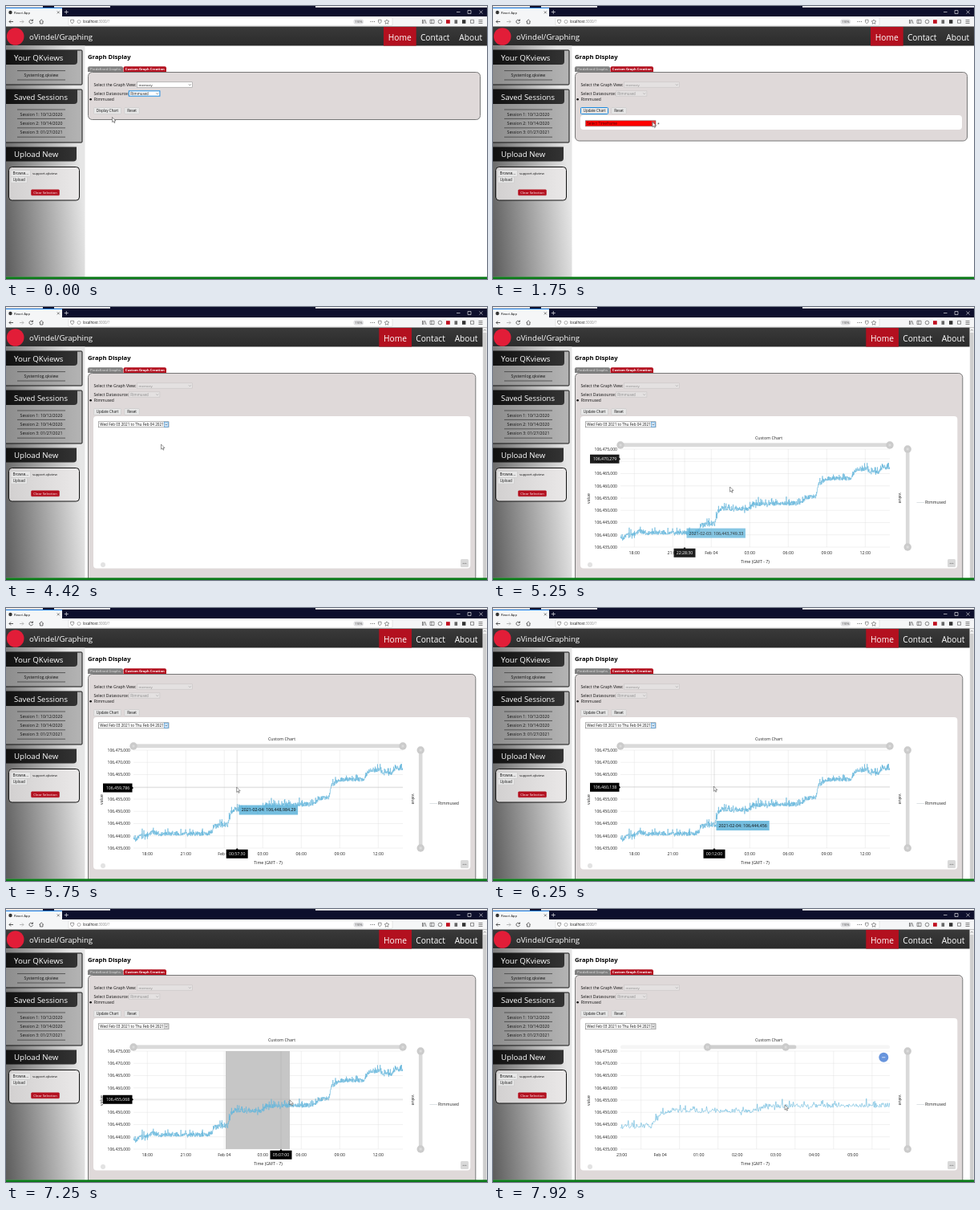
These frames come from a looping animation (600x340 px, 8 s). An HTML page:

```html
<!DOCTYPE html>
<html lang="en">
<head>
<meta charset="utf-8">
<title>Graph Display</title>
<style>
html, body { margin: 0; width: 100%; height: 100%; overflow: hidden; background: #fff; }
svg { display: block; width: 600px; height: 340px; }
text { font-family: "Open Sans", "Noto Sans", sans-serif; white-space: pre; }
</style>
</head>
<body>
<svg id="stage" viewBox="0 0 600 340" xmlns="http://www.w3.org/2000/svg">
  <defs>
    <linearGradient id="side" x1="0" y1="1" x2="1" y2=".75">
      <stop offset="0" stop-color="#5c5c5c"/><stop offset="1" stop-color="#e6e6e6"/>
    </linearGradient>
    <linearGradient id="head" x1="0" y1="0" x2="0" y2="1">
      <stop offset="0" stop-color="#3a3a3a"/><stop offset="1" stop-color="#2b2b2b"/>
    </linearGradient>
    <linearGradient id="card" x1="0" y1="0" x2="1" y2="0">
      <stop offset="0" stop-color="#111"/><stop offset="1" stop-color="#333"/>
    </linearGradient>
    <linearGradient id="box" x1="0" y1="0" x2="1" y2="0">
      <stop offset="0" stop-color="#8c8c8c"/><stop offset="1" stop-color="#b4b4b4"/>
    </linearGradient>
    <linearGradient id="form" x1="0" y1="0" x2="1" y2="0">
      <stop offset="0" stop-color="#d2d0d0"/><stop offset="1" stop-color="#eae8e8"/>
    </linearGradient>
    <clipPath id="plot"><rect x="159" y="177" width="336" height="122"/></clipPath>
  </defs>
</svg>
<script>
const LOOP = 8000, STEP = 1000 / 12;
const RED = '#b3101f', BLUE = '#67b7dc';
const LEFT = 159, RIGHT = 495, TOP = 177, BOTTOM = 299;
const MIDNIGHT = 272.3, HOUR = 16;
const svg = document.getElementById('stage');

// ---------- drawing helpers ----------
function el(parent, name, attrs, content) {
  const node = document.createElementNS('http://www.w3.org/2000/svg', name);
  for (const key in attrs) node.setAttribute(key, attrs[key]);
  if (content !== undefined) node.textContent = content;
  parent.appendChild(node);
  return node;
}
const set = (node, attrs) => { for (const key in attrs) node.setAttribute(key, attrs[key]); };
const show = (node, on) => { node.style.display = on ? '' : 'none'; };
const group = (parent, attrs) => el(parent, 'g', attrs);
const rect = (p, x, y, width, height, fill, more) => el(p, 'rect', { x, y, width, height, fill, ...more });
const circle = (p, cx, cy, r, fill, more) => el(p, 'circle', { cx, cy, r, fill, ...more });
const path = (p, d, stroke, width = 0.7, more) =>
  el(p, 'path', { d, stroke, 'stroke-width': width, fill: 'none', ...more });
const text = (p, x, y, size, str, fill = '#111', more) =>
  el(p, 'text', { x, y, 'font-size': size, fill, ...more }, str);
const mid = { 'text-anchor': 'middle' };
const end = { 'text-anchor': 'end' };

function button(p, x, y, w, h, label, size = 4.4, fill = '#e6e6e6', color = '#111', line = '#c2c2c2') {
  const g = group(p);
  g.box = rect(g, x, y, w, h, fill, { rx: 1, stroke: line, 'stroke-width': 0.5 });
  g.label = text(g, x + w / 2, y + h / 2 + 1.6, size, label, color, mid);
  return g;
}
function select(p, x, y, w, h, label, size) {
  const g = group(p);
  g.box = rect(g, x, y, w, h, '#fff', { stroke: '#999', 'stroke-width': 0.6 });
  g.label = text(g, x + 2, y + h / 2 + 1.6, size, label);
  g.arrow = path(g, `M${x + w - 4.6} ${y + h / 2 - 0.6}l1.4 1.4 1.4-1.4`, '#444', 0.6);
  return g;
}

// ---------- browser frame ----------
function browser() {
  rect(svg, 0, 0, 600, 13, '#0d0f2c');
  for (const [x, w] of [[0, 46], [60, 70], [386, 214]]) rect(svg, x, 0, w, 1.8, '#f4f4f4');
  rect(svg, 0, 2.4, 70, 11, '#f5f6f7');
  rect(svg, 0, 2.2, 70, 0.8, '#0a84ff');
  circle(svg, 5.5, 8, 2.2, '#333');
  text(svg, 10, 9.6, 4.3, 'React App');
  path(svg, 'M63.8 6.4l3 3m0-3l-3 3', '#333', 0.6);
  path(svg, 'M72.8 7.5h5m-2.5-2.5v5M562 7.5h4.5', '#fff', 0.6);
  path(svg, 'M576 5.5h4v4h-4zM590.5 5.5l4 4m0-4l-4 4', '#fff', 0.6);
  rect(svg, 0, 13, 600, 12.5, '#f5f6f7');
  path(svg, 'M9 19.5h-5m2-2l-2 2 2 2', '#333', 0.8);
  path(svg, 'M17 19.5h5m-2-2l2 2-2 2', '#aaa', 0.8);
  path(svg, 'M33 18a2.3 2.3 0 1 0 .5 2M33.5 16.5v2h-2', '#333');
  path(svg, 'M41.5 19.5l2.7-2.6 2.7 2.6M42.5 19v3h3.4v-3', '#333');
  rect(svg, 78, 14.5, 404, 9.8, '#fff', { rx: 1, stroke: '#ccc', 'stroke-width': 0.5 });
  path(svg, 'M80.6 17.2h4v2.4l-2 2.4-2-2.4z', '#555', 0.6);
  circle(svg, 91, 19.5, 2, 'none', { stroke: '#666', 'stroke-width': 0.5 });
  const url = text(svg, 96, 21, 4.4, 'localhost', '#111');
  el(url, 'tspan', { fill: '#888' }, ':3000/?');
  rect(svg, 433.5, 16.3, 12.5, 6.4, '#e2e2e4', { rx: 3 });
  text(svg, 439.8, 20.9, 3.6, '110%', '#333', mid);
  for (const x of [455, 457.3, 459.6]) circle(svg, x, 19.5, 0.6, '#555');
  path(svg, 'M464.5 17.2h3.6v3l-1.8 1.6-1.8-1.6z', '#555', 0.6);
  path(svg, 'M475 16.8l.9 1.9 2 .2-1.5 1.4.4 2-1.8-1-1.8 1 .4-2-1.5-1.4 2-.2z', '#555', 0.6);
  path(svg, 'M519.5 17v5m1.5-5v5m1.5-5l1.6 5', '#444');
  path(svg, 'M529 17.2h5v4.4h-5zM531 17.2v4.4', '#444', 0.6);
  circle(svg, 541.5, 19.5, 2.3, 'none', { stroke: '#444', 'stroke-width': 0.6 });
  rect(svg, 549, 17.2, 4.8, 4.6, '#c00f1f');
  rect(svg, 559.5, 17.3, 3.6, 4.6, '#666');
  rect(svg, 569, 17.2, 4.4, 4.6, '#333');
  path(svg, 'M579.5 17.3h4v4h-4z', '#444', 0.6);
  path(svg, 'M589.5 17.5h5m-5 2h5m-5 2h5', '#333', 0.6);
}

// ---------- page parts that stay ----------
function header() {
  rect(svg, 0, 25.5, 600, 24, 'url(#head)');
  circle(svg, 11.7, 38, 10.8, '#e21d38');
  text(svg, 29, 41.9, 9.7, 'oVindel/Graphing', '#fff');
  const nav = group(svg);
  rect(nav, 471, 26, 40.7, 23.5, RED);
  text(nav, 491.2, 42.6, 10.2, 'Home', '#fff', mid);
  text(nav, 535.2, 42.6, 10.2, 'Contact', '#fff', mid);
  text(nav, 579.7, 42.6, 10.2, 'About', '#fff', mid);
  return nav;
}
function card(y, h, title, size, w = 95) {
  if (h) rect(svg, -3, y, w + 3, h, 'url(#box)', { rx: 1, stroke: '#111', 'stroke-width': 1 });
  path(svg, `M0 ${y}h${w - 6}v14q0 4-4 4H0z`, 'none', 0, { fill: 'url(#card)' });
  text(svg, 10, y + 12.9, size, title, '#fff');
}
function rows(first, list) {
  const line = y => path(svg, `M14 ${y}h60`, '#222', 0.6);
  line(first);
  list.forEach((str, i) => {
    text(svg, 44, first + 7.6 + i * 11.4, 5.2, str, '#111', mid);
    line(first + 11.4 * (i + 1));
  });
}
function sidebar() {
  rect(svg, 0, 49.5, 98.5, 288, 'url(#side)');
  card(55, 43, 'Your QKviews', 9.7);
  rows(80.6, ['Systemlog.qkview']);
  card(104, 66, 'Saved Sessions', 9.5);
  rows(129, ['Session 1: 10/12/2020', 'Session 2: 10/14/2020', 'Session 3: 01/27/2021']);
  card(175.5, 0, 'Upload New', 9.7, 94);
  rect(svg, 3.5, 200.5, 88, 41.5, 'url(#form)', { rx: 4, stroke: '#111', 'stroke-width': 1 });
  button(svg, 6, 204.5, 24.5, 8, 'Browse...', 4.6);
  text(svg, 33, 210.2, 4.3, 'support.qkview');
  button(svg, 6, 212.8, 20.5, 7.4, 'Upload', 4.5);
  button(svg, 31.5, 228.8, 35, 7, 'Clear Selection', 4.3, RED, '#fff', RED);
}

browser();
const nav = header();
sidebar();
const scroll = group(svg);
rect(scroll, 594.5, 25.5, 5.5, 312, '#f0f0f0');
rect(scroll, 595.2, 32, 4.2, 306, '#cdcdcd');
path(scroll, 'M596 29.5l1.3-1.4 1.3 1.4', '#555', 0.6);

text(svg, 102, 65.6, 7.7, 'Graph Display', '#000', { 'font-weight': 700 });
const panel = rect(svg, 102.5, 82.5, 489, 59, '#dfd9d9', { rx: 5, stroke: '#777', 'stroke-width': 1 });
const tab = (x, w, fill) => path(svg, `M${x} 82v-4.7q0-2 2-2h${w - 4}q2 0 2 2v4.7z`, 'none', 0, { fill });
tab(102, 44, '#808080');
text(svg, 124, 80.1, 4.35, 'Predefined Graphs', '#e6e6e6', mid);
tab(146.5, 53.5, RED);
text(svg, 173.3, 80.1, 4.2, 'Custom Graph Creation', '#fff', { ...mid, 'font-weight': 700 });
text(svg, 109.5, 99.8, 5.1, 'Select the Graph View:');
text(svg, 109.5, 110.9, 5.1, 'Select Datasource:');
circle(svg, 105.6, 116.2, 1.3, '#000');
text(svg, 109.8, 118.2, 4.9, 'Rtmmused');
const view = select(svg, 163.5, 94.8, 69, 6.4, 'memory', 4.35);
const source = select(svg, 153.3, 105.8, 38.6, 6.4, 'Rtmmused', 4.4);
const go = button(svg, 109.5, 126.5, 34, 8, 'Display Chart');
button(svg, 147.8, 126.5, 18.5, 8, 'Reset', 4.5);

const white = rect(svg, 109, 136, 476, 18, '#fff', { rx: 4 });
const frame = select(svg, 115.3, 142.8, 87.7, 7, '', 4.65);
const frameBox = rect(frame, 197.6, 143.2, 5, 6.2, '#cfe6fa', { 'stroke-width': 0.6 });
frame.appendChild(frame.arrow);
const star = text(svg, 205, 148.8, 5, '*', '#333');
const menu = group(svg);
rect(menu, 115.3, 150.3, 87.7, 15, '#fff', { stroke: '#888', 'stroke-width': 0.5 });
const hover = rect(menu, 115.6, 150.6, 87.1, 7.2, '#1e78d7');
const options = ['Select Timeframe', 'Wed Feb 03 2021 to Thu Feb 04 2021']
  .map((str, i) => text(menu, 117.3, 155.9 + i * 7.3, 4.6, str));

// ---------- chart ----------
const shell = group(svg);
circle(shell, 121, 321, 3, '#e2e2e2');
rect(shell, 567, 314, 10, 10, '#d9d9d9', { rx: 1.5 });
for (const x of [570.2, 572, 573.8]) circle(shell, x, 319.3, 0.5, '#555');

const chart = group(svg);
text(chart, 344, 164.6, 5.3, 'Custom Chart', '#222', mid);
text(chart, 327, 319, 5.3, 'Time (GMT - 7)', '#222', mid);
text(chart, 0, 0, 5.2, 'value', '#222', { ...mid, transform: 'translate(121.3 238.5) rotate(-90)' });
text(chart, 0, 0, 5.2, 'value', '#222', { ...mid, transform: 'translate(506.3 238) rotate(90)' });
path(chart, 'M528.5 243.5h9.5', '#cfd6da', 0.7);
text(chart, 539, 245.4, 5.1, 'Rtmmused', '#222');
for (let i = 0; i < 9; i++) {
  const y = BOTTOM - i * 15.25;
  path(chart, `M${LEFT} ${y}H${RIGHT}`, '#e2e2e2', 0.5);
  text(chart, 155, y + 1.9, 5.05, (106435000 + i * 5000).toLocaleString('en-US'), '#222', end);
}
const grid = path(chart, '', '#e2e2e2', 0.5, { 'clip-path': 'url(#plot)' });
const ticks = Array.from({ length: 9 }, () => text(chart, 0, 308.2, 5.25, '', '#222', mid));
const brush = rect(chart, 274, TOP, 0, BOTTOM - TOP, '#c6c6c6');
const series = path(chart, '', BLUE, 0.65, { 'clip-path': 'url(#plot)', 'stroke-linejoin': 'round' });

const grip = (x, y, turn = 0) => {
  const g = group(chart, { transform: `translate(${x} ${y}) rotate(${turn})` });
  circle(g, 0, 0, 4.7, '#cbcbcb');
  path(g, 'M-.8-1.5v3M.8-1.5v3', '#f2f2f2', 0.6);
  return g;
};
rect(chart, LEFT, 169.6, 336, 4.6, '#f5f5f5', { rx: 2.3 });
const bar = rect(chart, LEFT, 169.6, 336, 4.6, '#dadada', { rx: 2.3 });
const gripL = grip(LEFT, 172), gripR = grip(RIGHT, 172);
rect(chart, 514.9, TOP, 4.6, 122, '#dadada', { rx: 2.3 });
grip(517.2, TOP, 90);
grip(517.2, BOTTOM, 90);
const out = group(chart);
circle(out, 487.3, 184.8, 6, '#6794dc');
path(out, 'M485.2 184.8h4.2', '#fff', 0.7);

const cross = group(chart);
const hair = path(cross, '', '#aaa', 0.5);
const tagY = group(cross);
path(tagY, 'M121-5.5h36.5v4l1.5 1.5-1.5 1.5v4H121z', 'none', 0, { fill: '#000' });
const valueY = text(tagY, 139.5, 1.9, 5.2, '', '#fff', mid);
const tagX = group(cross);
path(tagX, 'M-13.5 300.7h12l1.5-1.7 1.5 1.7h12v11h-27z', 'none', 0, { fill: '#000' });
const valueX = text(tagX, 0, 308.2, 5.2, '', '#fff', mid);
const tip = group(cross);
const tipBox = rect(tip, 2.5, -6, 67, 12, BLUE, { opacity: 0.9 });
path(tip, 'M0 0l2.6-2v4z', 'none', 0, { fill: BLUE });
const tipText = text(tip, 5.5, 1.9, 5.3, '', '#111');

rect(svg, 0, 337.3, 600, 2.7, '#0b7a18');
const pointer = path(svg, 'M0 0v6.2l1.5-1.3 1 2.3 1-.5-1-2.2h2z', '#333', 0.5, { fill: '#fff' });

// ---------- data ----------
const level = [[159, 287], [163, 288], [168, 283], [174, 285], [182, 279.5], [190, 282], [256, 281.5],
  [260, 272], [276.5, 271], [280.5, 255], [286, 251.5], [320, 252], [324, 246], [385, 244.5], [390, 238],
  [403, 236], [406, 221], [418, 214], [446, 214], [452, 204], [466, 202], [470, 206], [481, 207],
  [486, 199], [495, 202]];

function track(keys, t) {
  if (t <= keys[0][0]) return keys[0].slice(1);
  for (let i = 1; i < keys.length; i++) {
    const a = keys[i - 1], b = keys[i];
    if (t <= b[0]) {
      const k = (t - a[0]) / (b[0] - a[0]);
      return a.slice(1).map((v, j) => v + (b[j + 1] - v) * k);
    }
  }
  return keys[keys.length - 1].slice(1);
}
let seed = 7;
const random = () => (seed = (seed * 16807) % 2147483647) / 2147483647;
const points = Array.from({ length: 1261 }, (_, i) => {
  const x = LEFT + i * 336 / 1260;
  let y = track(level, x)[0] - 0.5 + (random() - 0.5) * 5.4;
  const r = random();
  if (r < 0.1) y -= 2 + random() * 4.5;
  else if (r < 0.14) y += 1 + random() * 2;
  return [x, y];
});

// ---------- motion ----------
const cursorKeys = [[0, 132.5, 138.5], [250, 124, 130], [1200, 124, 130], [1700, 199, 144.5],
  [2650, 199, 144.5], [3050, 186, 157], [3330, 186, 159], [3430, 192, 168], [3600, 192, 168],
  [3750, 193.5, 171], [4900, 193.5, 171], [5240, 295.5, 224], [5500, 295.5, 224], [6150, 275.3, 222],
  [6500, 275.3, 222], [6650, 274, 226], [6850, 274, 226], [7250, 354, 237.8], [7550, 364, 244]];
// time, x, y, minutes from midnight, axis value, series value
const crossKeys = [[4950, 194, 178, -290, 474600, 440900], [5250, 239, 189, -91.5, 470279, 443749.33],
  [5500, 295, 224, 83, 459590, 451500], [6200, 276, 223, 12, 460138, 444456],
  [6500, 276, 223, 12, 460138, 444456], [6700, 274, 226, 5, 458934, 444300],
  [6900, 274, 226, 5, 458934, 444300], [7250, 343, 237, 307, 455068, 452600],
  [7550, 364, 244, 342, 453033, 452700]];
const CLICK = 420, OPEN = 2660, PICK = 3400, LOADED = 4410, PRESS = 6850, ZOOM = 7640;

const clamp = v => Math.max(0, Math.min(1, v));
const mix = (a, b, k) => a + (b - a) * k;
const cubicOut = k => 1 - (1 - clamp(k)) ** 3;
const pad = n => String(n).padStart(2, '0');

function clock(minutes) {
  const half = (Math.round(minutes * 2) + 2880) % 2880;
  return `${pad(Math.floor(half / 120))}:${pad(Math.floor(half / 2) % 60)}:${half % 2 ? '30' : '00'}`;
}

function drawPlot(t) {
  const k = cubicOut((t - ZOOM) / 500), lead = cubicOut((t - ZOOM) / 330);
  const a = mix(LEFT, 274, k), b = mix(RIGHT, 364, k);
  const sx = x => LEFT + (x - a) * (RIGHT - LEFT) / (b - a);
  let d = '';
  for (const [x, y] of points) {
    if (x > a - 1 && x < b + 1) d += (d ? 'L' : 'M') + sx(x).toFixed(2) + ' ' + y.toFixed(2);
  }
  set(series, { d, 'stroke-width': mix(0.65, 0.6, k) });

  const fine = b - a < 200, step = fine ? 1 : 3;
  let lines = '', n = 0;
  for (let h = -9; h <= 15; h += step) {
    const x = sx(MIDNIGHT + h * HOUR), c = fine ? sx(MIDNIGHT + (h + 0.5) * HOUR) : x;
    lines += `M${x} ${TOP}V${BOTTOM}`;
    if (c < LEFT || c > RIGHT || n >= ticks.length) continue;
    ticks[n].setAttribute('x', c);
    ticks[n++].textContent = h ? pad((h + 24) % 24) + ':00' : 'Feb 04';
  }
  grid.setAttribute('d', lines);
  ticks.forEach((node, i) => show(node, i < n));

  const l = mix(LEFT, 268, lead), r = mix(RIGHT, 364.5, lead);
  set(gripL, { transform: `translate(${l} 172)` });
  set(gripR, { transform: `translate(${r} 172)` });
  set(bar, { x: l, width: mix(RIGHT, 367, k) - l, fill: k > 0 ? '#cfcfcf' : '#dadada' });
  show(out, t >= ZOOM + 60);
}

function drawCross(t) {
  const on = t >= 5000 && t < ZOOM;
  show(cross, on);
  if (!on) return;
  const [x, y, minutes, axis, value] = track(crossKeys, t);
  set(hair, { d: `M${LEFT} ${y}H${RIGHT}M${x} ${TOP}V${BOTTOM}`, opacity: t < 5500 ? 0.4 : 0.7 });
  set(tagY, { transform: `translate(0 ${y + 0.3})` });
  set(tagX, { transform: `translate(${x} 0)` });
  set(cross, { opacity: t < 5400 ? 0.88 : 1 });
  valueY.textContent = Math.round(106e6 + axis).toLocaleString('en-US');
  valueX.textContent = clock(minutes);
  show(tip, t < PRESS);
  const label = `2021-02-${minutes < 0 ? '03' : '04'}:\u00a0` +
    (106e6 + value).toLocaleString('en-US', { maximumFractionDigits: 2 });
  tipText.textContent = label;
  set(tipBox, { width: label.length * 2.4 + 11 });
  set(tip, { transform: `translate(${x} ${track(level, x)[0]})` });
}

function drawForm(t, cx, cy) {
  const clicked = t >= CLICK, picked = t >= PICK, loaded = t >= LOADED;
  const focus = (node, on, line) => set(node.box, { stroke: on ? '#1c8be0' : line, 'stroke-width': on ? 1 : 0.5 });
  for (const s of [view, source]) {
    set(s.box, { fill: clicked ? '#e4e1e1' : '#fff' });
    set(s.label, { fill: clicked ? '#888' : '#111' });
    set(s.arrow, { stroke: clicked ? '#999' : '#444' });
    focus(s, s === source && !clicked, clicked ? '#c4c0c0' : '#888');
  }
  go.label.textContent = clicked ? 'Update Chart' : 'Display Chart';
  focus(go, clicked && t < OPEN, '#c2c2c2');
  const over = cx > 109 && cx < 144 && cy > 126 && cy < 135;
  set(go.box, { fill: over ? '#d4d4d4' : '#e6e6e6' });

  show(white, clicked);
  show(frame, clicked);
  show(star, clicked && !picked);
  show(menu, t >= OPEN && !picked);
  const row = cy > 155 ? 1 : 0;
  set(hover, { y: 150.6 + row * 7.2 });
  options.forEach((node, i) => set(node, { fill: i === row ? '#fff' : '#111' }));
  frame.label.textContent = options[picked ? 1 : 0].textContent;
  set(frame.label, { fill: picked ? '#111' : '#4a0000' });
  const active = t >= OPEN && t < PRESS;
  set(frame.box, { fill: picked ? '#fff' : '#f00', stroke: '#777' });
  set(frameBox, {
    fill: active ? '#cfe6fa' : picked ? '#dedede' : '#e04848',
    stroke: active ? '#3c8fd0' : picked ? '#aaa' : 'none'
  });

  const shift = loaded ? 5.7 : 0;
  set(nav, { transform: `translate(${-shift} 0)` });
  show(scroll, loaded);
  set(panel, { width: 489 - shift, height: loaded ? 262 : clicked ? 85.5 : 59 });
  set(white, { width: 476 - shift, height: loaded ? 189.5 : 18 });
  show(shell, loaded);
}

function draw(now) {
  const t = Math.floor((now % LOOP + 1) / STEP) * STEP % LOOP;
  const [cx, cy] = track(cursorKeys, t);
  set(pointer, { transform: `translate(${cx} ${cy})` });
  drawForm(t, cx, cy);
  const ready = t > LOADED + 50;
  show(chart, ready);
  if (!ready) return;
  set(chart, { opacity: clamp((t - 4450) / 250) });
  set(series, { opacity: clamp((t - 4560) / 350) });
  const drag = t >= PRESS && t < ZOOM;
  show(brush, drag);
  if (drag) set(brush, { width: Math.max(0, cx - 274) });
  drawPlot(t);
  drawCross(t);
}

const start = performance.now();
function loop() {
  draw(performance.now() - start);
  requestAnimationFrame(loop);
}
loop();
</script>
</body>
</html>
```
